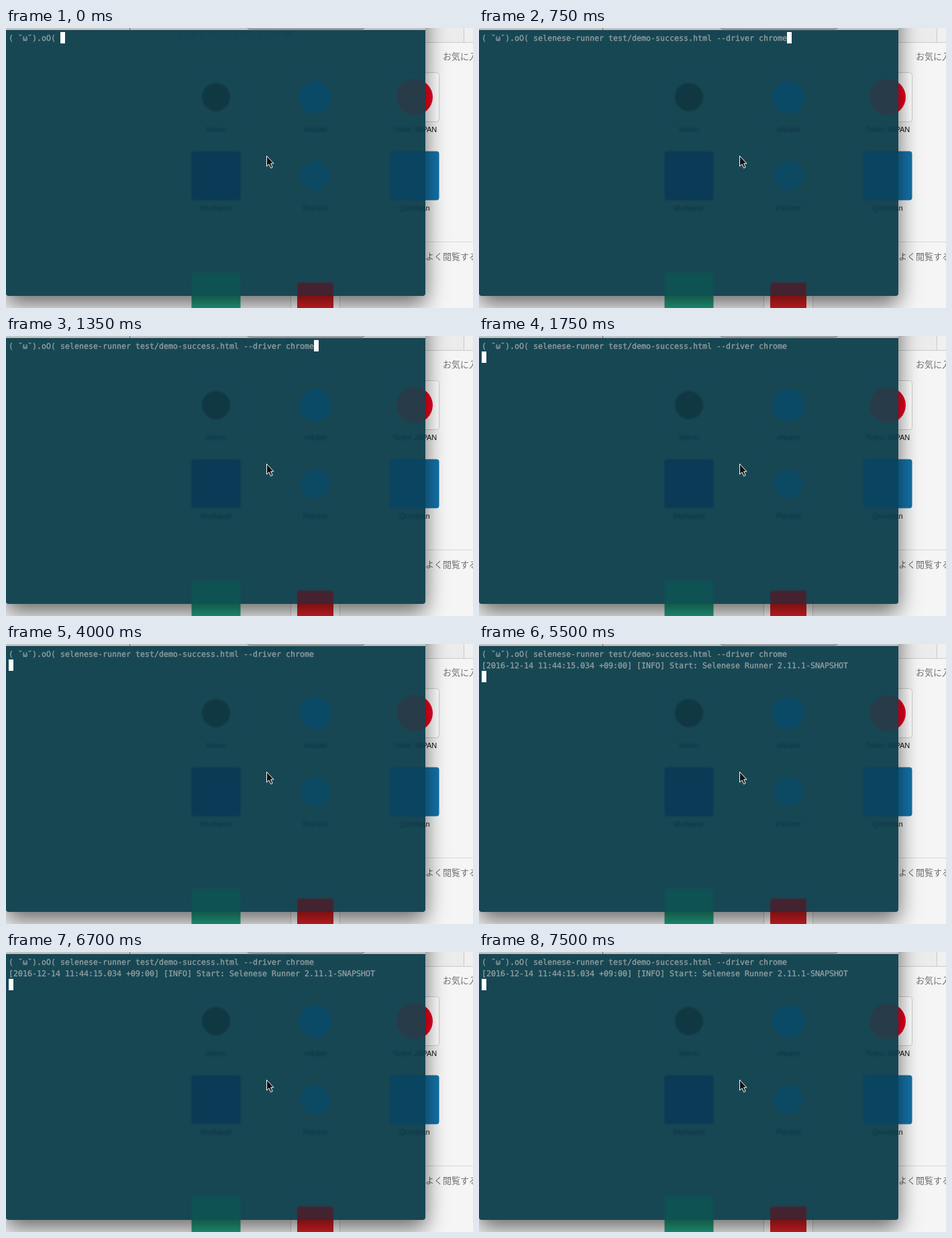
Animation of 696x417 px, one loop 8 s. Source, as an HTML page:

```html
<!DOCTYPE html>
<html lang="ja">
<head>
<meta charset="utf-8">
<title>Terminal run</title>
<style>
  html, body { margin: 0; width: 100%; height: 100%; overflow: hidden; background: #f5f5f5; }
  svg { display: block; width: 100%; height: 100%; }
  .mono { font: 11.63px "DejaVu Sans Mono", monospace; fill: #93a1a1; stroke: #93a1a1; stroke-width: .3; white-space: pre; text-rendering: geometricPrecision; }
  .label { font: 11px "Liberation Sans", Arial, sans-serif; text-anchor: middle; }
  .head { font: 13px "Noto Sans CJK JP", "Noto Sans CJK", sans-serif; fill: #707070; }
</style>
</head>
<body>
<svg viewBox="0 0 696 417" xmlns="http://www.w3.org/2000/svg">
  <defs>
    <filter id="shadow" x="-20%" y="-20%" width="140%" height="140%" color-interpolation-filters="sRGB">
      <feDropShadow dx="0" dy="12" stdDeviation="16" flood-color="#000" flood-opacity=".58"/>
    </filter>
    <filter id="soft" x="-20%" y="-40%" width="140%" height="180%" color-interpolation-filters="sRGB">
      <feGaussianBlur stdDeviation=".8"/>
    </filter>
    <clipPath id="pane"><path id="paneShape" d="M0 3H625V395Q625 399 621 399H4Q0 399 0 395Z"/></clipPath>
  </defs>

  <rect width="696" height="417" fill="#f5f5f5"/>
  <rect x="620" width="62" height="21" fill="#ececec"/>
  <rect x="683" width="13" height="21" fill="#f0f0f0"/>
  <path d="M620 21.5H696M682.5 0V21" stroke="#cacaca" fill="none"/>
  <path d="M620 318.5H696" stroke="#d8d8d8"/>
  <text class="head" x="651" y="47">お気に入り</text>
  <text class="head" x="625" y="344.5">よく閲覧する</text>
  <g id="page"></g>

  <path d="M0 -90H625V395Q625 399 621 399H4Q0 399 0 395Z" fill="#c2c4c4" filter="url(#shadow)"/>
  <path d="M184.5 0V3" stroke="#666"/>
  <path d="M360 0Q361 1.5 364 1.5H530Q533 1.5 534 0" fill="#d8d8d8" stroke="#555"/>
  <use href="#paneShape" fill="#184754"/>
  <g clip-path="url(#pane)"><g id="dim" filter="url(#soft)"></g></g>

  <text class="mono" x="4" y="19">( ˘ω˘).oO( </text>
  <text class="mono" id="command" x="81" y="19">selenese-runner test/demo-success.html --driver chrome</text>
  <text class="mono" id="log" x="4" y="36">[2016-12-14 11:44:15.034 +09:00] [INFO] Start: Selenese Runner 2.11.1-SNAPSHOT</text>
  <rect id="caret" width="7" height="17" fill="#fff"/>
  <path d="M388.5 190.5V206L392 202.8L394.6 208.6L397.2 207.4L394.7 201.8H399Z"
        fill="#111" stroke="#fff" stroke-linejoin="round"/>
</svg>
<script>
const LOOP = 8000, CELL = 7, ROW = 17;
const $ = id => document.getElementById(id);

// kind, center x, center y, size, page colour, colour seen through the pane, label
const sites = [
  ["circle", 313, 103, 42, "#222", "#103843", "Velmo"],
  ["circle", 461, 103, 48, "#2a9fe0", "#0a4a66", "oNubel"],
  ["circle", 609, 103, 54, "#f00020", "#273b49", "Tizko! JAPAN"],
  ["square", 313, 220, 73, "#3b5998", "#0a3a55", "Murbanel"],
  ["circle", 461, 220, 44, "#1da1f2", "#0c4a64", "Plonket"],
  ["square", 609, 220, 73, "#1472a8", "#094560", "Quorbian"],
  ["square", 313, 401, 73, "#23a585", "#0e5254", ""],
  ["square", 461, 406, 54, "#e02024", "#44222f", ""]
];

function mark(kind, x, y, size, fill) {
  const r = size / 2;
  return kind === "circle"
    ? `<circle cx="${x}" cy="${y}" r="${r}" fill="${fill}"/>`
    : `<rect x="${x - r}" y="${y - r}" width="${size}" height="${size}" rx="4" fill="${fill}"/>`;
}

function tile(x, y, fill, edge) {
  return `<rect x="${x - 36.5}" y="${y - 36.5}" width="73" height="73" rx="4" fill="${fill}" stroke="${edge}"/>`;
}

function draw(dim) {
  return sites.map(([kind, x, y, size, bright, dark, name]) => {
    const base = size < 73 ? tile(x, y > 300 ? 401 : y, dim ? "#184754" : "#fff", dim ? "#174451" : "#d0d0d0") : "";
    const text = name ? `<text class="label" x="${x}" y="${y + 52}" fill="${dim ? "#0c3340" : "#111"}">${name}</text>` : "";
    return base + mark(kind, x, y, size, dim ? dark : bright) + text;
  }).join("");
}

$("page").innerHTML = draw(false);
$("dim").innerHTML = draw(true) +
  '<text class="label" x="340" y="14" fill="#15414e">よく見るページとお気に入りの一覧</text>';

function show(id, on) {
  $(id).setAttribute("visibility", on ? "visible" : "hidden");
}

function render(t) {
  const typed = t >= 750, entered = t >= 1750, started = t >= 5500;
  show("command", typed);
  show("log", started);
  const col = entered ? 0 : typed ? 65 : 11;
  const row = started ? 2 : entered ? 1 : 0;
  $("caret").setAttribute("x", 4 + col * CELL);
  $("caret").setAttribute("y", 6 + row * ROW);
}

const begin = performance.now();
function tick() {
  render((performance.now() - begin) % LOOP);
  requestAnimationFrame(tick);
}
tick();
</script>
</body>
</html>
```
